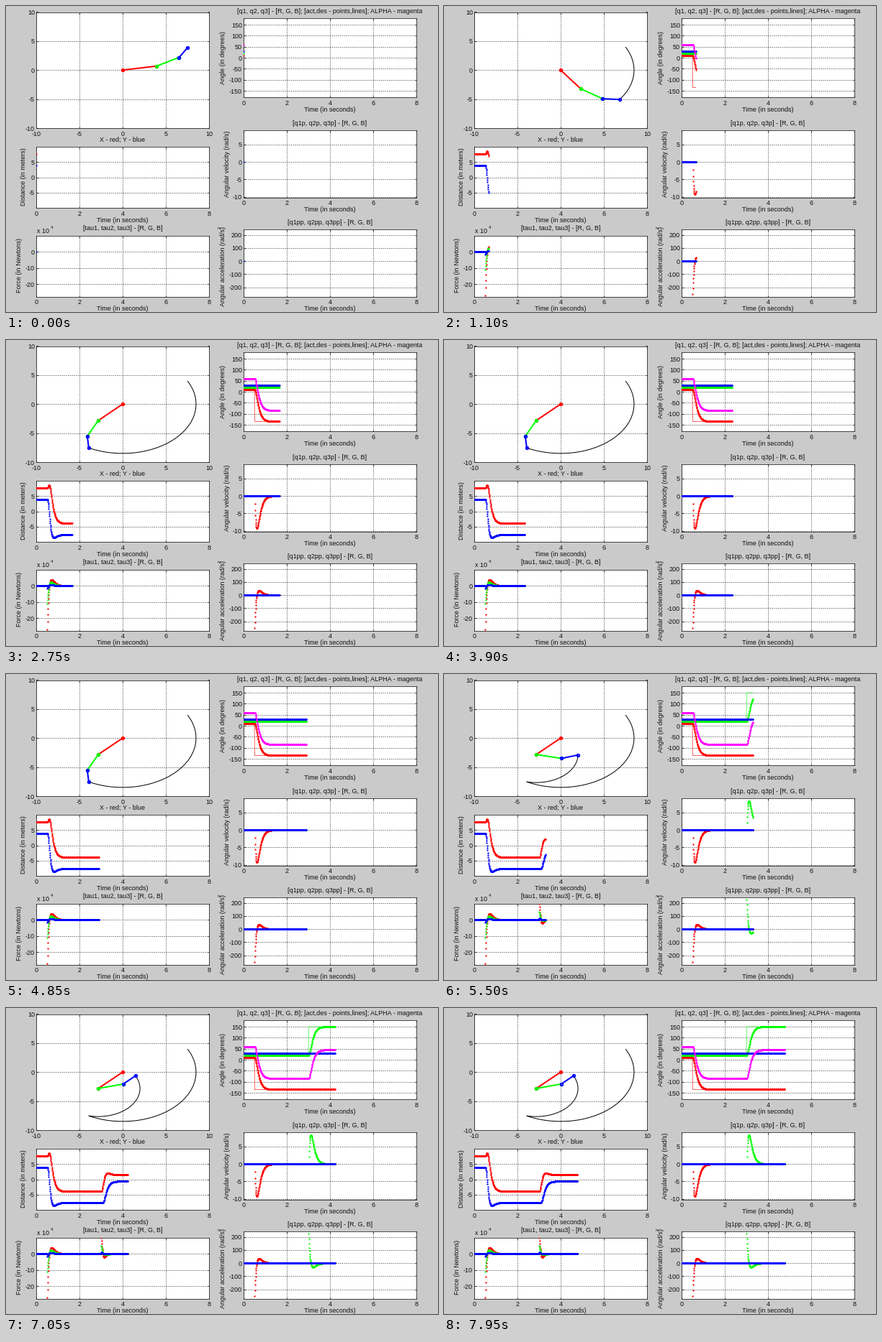
Write a matplotlib script that moves like this. It is 600 px wide and 426 px high and loops after 8 s.

```python
import numpy as np
import matplotlib.pyplot as plt
from matplotlib.animation import FuncAnimation

W, H, DPI = 600, 426, 64
PX = 72 / DPI                      # points per pixel
FRAMES, PER_FRAME, DT = 160, 3, 0.01
RED, GREEN, BLUE, MAGENTA = "#ff0000", "#00ff00", "#0000ff", "#ff00ff"
RGB = (RED, GREEN, BLUE)

plt.rcParams.update({
    "font.family": "Liberation Sans",
    "font.size": 9 * PX,
    "axes.unicode_minus": False,
    "axes.axisbelow": True,
    "text.color": "#111111",
})


# --- Three-link arm with critically damped joint control ---

N = FRAMES * PER_FRAME
step_no = np.arange(N)
time = step_no * DT
OMEGA = 10.0
LEN = np.array([4.0, 3.0, 2.0])
MASS, GRAV = 11.3, 9.81


def respond(start, goal, onset):
    """Joint angle, speed, acceleration and command, in radians."""
    a, b = np.radians([start, goal])
    on = step_no >= onset
    s = np.where(on, (step_no - onset) * DT, 0)
    gap, decay = a - b, np.exp(-OMEGA * s)
    pos = b + gap * (1 + OMEGA * s) * decay
    vel = -gap * OMEGA ** 2 * s * decay
    acc = np.where(on, -gap * OMEGA ** 2 * (1 - OMEGA * s) * decay, 0)
    return pos, vel, acc, np.where(on, b, a)


joints = [respond(10, -135, 51), respond(20, 150, 301), respond(30, 30, 0)]
q, qp, qpp, goal = np.array(joints).transpose(1, 0, 2)

ang, angp, angpp = (np.cumsum(v, axis=0) for v in (q, qp, qpp))
link = LEN[:, None] * np.exp(1j * ang)
link_acc = link * (1j * angpp - angp ** 2)
tips = np.vstack([np.zeros(N), np.cumsum(link, axis=0)])
mid = tips[1:] - link / 2
mid_acc = np.cumsum(link_acc, axis=0) - link_acc / 2 + 1j * GRAV


def torque(j):
    total = np.zeros(N)
    for i in range(j, 3):
        arm = 1j * (mid[i] - tips[j])
        total += MASS * (np.conj(mid_acc[i]) * arm).real
        total += MASS * LEN[i] ** 2 / 12 * angpp[i]
    return total / 1e4


tau = [torque(j) for j in range(3)]


# --- Static layout ---

fig = plt.figure(figsize=(W / DPI, H / DPI), dpi=DPI, facecolor="#cacaca")


def label(x, y, text, size=9, **kw):
    kw = {"ha": "center", "va": "center", **kw}
    fig.text(x / W, 1 - y / H, text, fontsize=size * PX, **kw)


def panel(left, top, bottom, xlim, ylim, xticks, yticks):
    ax = fig.add_axes([left / W, 1 - bottom / H, 240 / W, (bottom - top) / H])
    ax.set(xlim=xlim, ylim=ylim, xticks=xticks, yticks=yticks)
    ax.grid(color="#505050", lw=0.8 * PX, ls=(0, (1.8, 1.6)))
    ax.tick_params(direction="in", top=True, right=True, length=2.5 * PX,
                   width=0.7 * PX, labelcolor="#111111")
    ax.tick_params(axis="x", pad=3.7 * PX)
    ax.tick_params(axis="y", pad=2 * PX)
    for side in ax.spines.values():
        side.set(linewidth=0.8 * PX, color="#222222")
    return ax


def chart(left, top, bottom, ylim, yticks, title, title_y, name, name_x, name_y):
    ax = panel(left, top, bottom, (0, 8), ylim, range(0, 9, 2), yticks)
    label(left + 120, title_y, title)
    label(left + 120, bottom + 17.5, "Time (in seconds)")
    label(name_x, name_y, name, rotation=90)
    return ax


fives = range(-10, 11, 5)
arm_ax = panel(42, 8.5, 170, (-10, 10), (-10, 10), fives, fives)
dist_ax = chart(42, 196, 281, (-9.9, 9.9), (-5, 0, 5),
                "X - red; Y - blue", 186.5, "Distance (in meters)", 24.5, 238)
tau_ax = chart(42, 320, 404.5, (-27.5, 9.7), (-20, -10, 0),
               "[tau1, tau2, tau3] - [R, G, B]", 310, "Force (in Newtons)", 19, 361)
ang_ax = chart(330, 16.8, 127.2, (-180, 180), range(-150, 151, 50),
               "[q1, q2, q3] - [R, G, B]; [act,des - points,lines]; ALPHA - magenta",
               7.5, "Angle (in degrees)", 302, 72)
vel_ax = chart(330, 172.5, 266.5, (-10.2, 9.2), (-10, -5, 0, 5),
               "[q1p, q2p, q3p] - [R, G, B]", 163, "Angular velocity (rad/s)", 307, 220)
acc_ax = chart(330, 311, 404.5, (-270, 241), range(-200, 201, 100),
               "[q1pp, q2pp, q3pp] - [R, G, B]", 301,
               "Angular acceleration (rad/s)", 302, 362)
label(297.5, 308.5, "2", 6, rotation=90)
label(43, 314, "x 10", ha="left")
label(63, 308.5, "4", 6)

# Render the fixed layout once and reuse it as the backdrop.
fig.canvas.draw()
backdrop = np.array(fig.canvas.buffer_rgba())[..., :3].copy()
for text in list(fig.texts):
    text.remove()
for ax in fig.axes:
    ax.set_axis_off()
    ax.set_autoscale_on(False)
fig.figimage(backdrop, zorder=-1)


# --- Moving parts ---

traces = []


def trace(ax, values, color, **style):
    line, = ax.plot([], [], color=color, **style)
    traces.append((line, values))


def dots(ax, values, color):
    trace(ax, values, color, ls="none", marker="o", ms=2.3 * PX, mew=0)


for j, color in enumerate(RGB):
    trace(ang_ax, np.degrees(goal[j]), color, lw=0.6 * PX)
for j, color in enumerate(RGB):
    dots(ang_ax, np.degrees(q[j]), color)
    dots(vel_ax, qp[j], color)
    dots(acc_ax, qpp[j], color)
    dots(tau_ax, tau[j], color)
dots(ang_ax, np.degrees(ang[2]), MAGENTA)
dots(dist_ax, tips[3].real, RED)
dots(dist_ax, tips[3].imag, BLUE)

path, = arm_ax.plot([], [], color="black", lw=1 * PX)
bars = [arm_ax.plot([], [], color=c, lw=2 * PX, marker="o", ms=3.6 * PX,
                    mew=1.8 * PX, mfc="none")[0] for c in RGB]


def draw(frame):
    n = frame * PER_FRAME
    for line, values in traces:
        line.set_data(time[:n + 1], values[:n + 1])
    path.set_data(tips[3, :n + 1].real, tips[3, :n + 1].imag)
    for j, bar in enumerate(bars):
        ends = tips[j:j + 2, n]
        bar.set_data(ends.real, ends.imag)
    return [path, *bars, *(line for line, _ in traces)]


anim = FuncAnimation(fig, draw, frames=FRAMES, interval=50, repeat=True,
                     repeat_delay=0, blit=False)
plt.show()
```
